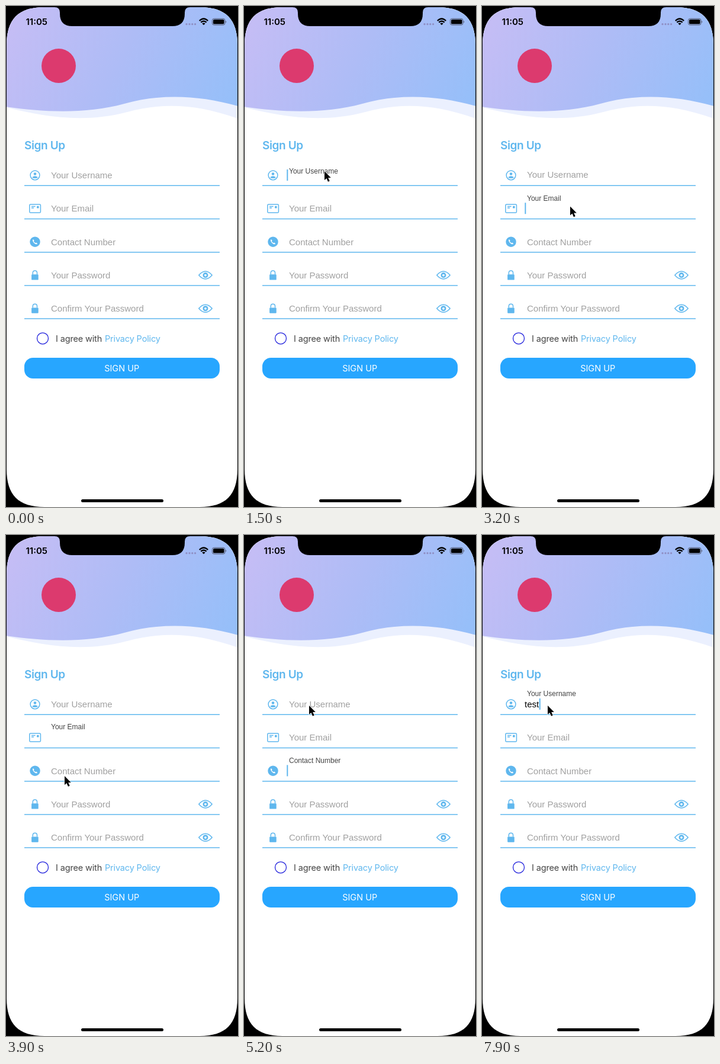
An HTML page for the animation above (8 s loop, 392x846 px).

```html
<!DOCTYPE html>
<html lang="en">
<head>
<meta charset="utf-8">
<title>Sign Up</title>
<style>
html, body { margin: 0; width: 100%; height: 100%; overflow: hidden; background: #000; }
svg { display: block; width: 392px; height: 846px; }
.ui { font-family: Inter, sans-serif; }
.field { font-family: "Liberation Sans", Arial, sans-serif; font-size: 15px; }
.blue { fill: #5fb7ee; }
.line { fill: none; stroke: #5fb7ee; stroke-width: 1.5; }
.body { font-size: 14.5px; letter-spacing: -.15px; }
</style>
</head>
<body>
<svg viewBox="0 0 392 846">
  <defs>
    <linearGradient id="sky" gradientUnits="userSpaceOnUse" x1="10" y1="20" x2="360" y2="200">
      <stop offset="0" stop-color="#c5bdf5"/>
      <stop offset=".5" stop-color="#aebcf6"/>
      <stop offset="1" stop-color="#96bff9"/>
    </linearGradient>
    <clipPath id="screen">
      <path d="M1 66C1 22 21 2 65 2H327C371 2 391 22 391 66V782C391 826 371 846 327 846H65C21 846 1 826 1 782Z"/>
    </clipPath>
    <g id="user">
      <circle r="7.9" class="line"/>
      <circle cy="-2.3" r="2.3" class="blue"/>
      <path d="M-4.7 4.2C-4 .6 4 .6 4.7 4.2Q0 6-4.7 4.2Z" class="blue"/>
    </g>
    <g id="mail">
      <rect x="-9.2" y="-7" width="18.6" height="14" rx="1.6" class="line"/>
      <path d="M-6-3.4H.6M-6-.9H-2" class="line" stroke-width="1.2"/>
      <rect x="3" y="-4.2" width="3.6" height="3.6" rx="1" class="blue"/>
    </g>
    <g id="phone">
      <circle r="8.7" class="blue"/>
      <path d="M-3.1-4.2C-4.7-3-4-.6-1.8 1.7S3 4.7 4.2 3.2L2.2 1.3 .8 2.1Q-1.3 1.1-2.2-.9L-1.3-2.2Z" fill="#fff"/>
    </g>
    <g id="lock">
      <rect x="-5.9" y="-1.2" width="11.6" height="9.4" rx="1.2" class="blue"/>
      <path d="M-3.7-1V-3.8C-3.7-8.6 3.5-8.6 3.5-3.8V-1" class="line"/>
    </g>
    <g id="eye">
      <path d="M-11.2 0Q0-13 11.2 0Q0 13-11.2 0Z" class="line" stroke-linejoin="round"/>
      <circle r="3.2" class="line" style="stroke-width:2.6"/>
    </g>
  </defs>

  <g clip-path="url(#screen)">
    <rect width="392" height="846" fill="#fff"/>
    <path d="M0 0V171C60 186 130 199 205 179C265 163 320 165 392 190V0Z" fill="#ebf0fe"/>
    <path d="M0 0V170C60 179 135 183 200 165C260 148 325 150 392 169V0Z" fill="url(#sky)"/>
  </g>
  <path d="M82 0V2Q91 2 91 11V13Q91 34 112 34H281Q302 34 302 13V11Q302 2 311 2V0Z"/>
  <circle cx="89" cy="101" r="29" fill="#dc3a6e"/>

  <text class="ui" x="33.5" y="32.3" font-size="15" font-weight="600">11:05</text>
  <g fill="#8f8fc4">
    <circle cx="305" cy="30.7" r="1.6"/><circle cx="310" cy="30.7" r="1.6"/>
    <circle cx="314.8" cy="30.7" r="1.6"/><circle cx="319.6" cy="30.7" r="1.6"/>
  </g>
  <g fill="none" stroke="#000" stroke-width="2.3">
    <path d="M326.8 25Q334 18 341.2 25M329.3 27.7Q334 23.2 338.7 27.7"/>
  </g>
  <path d="M331.3 29.5Q334 27.3 336.7 29.5L334 32.3Z"/>
  <rect x="348.5" y="21.3" width="21.5" height="10.8" rx="3" fill="none" stroke="#555a72"/>
  <rect x="350" y="22.8" width="18.5" height="7.8" rx="1.7"/>
  <path d="M371.2 25Q373.4 26.7 371.2 28.6Z" fill="#555a72"/>

  <text class="ui blue" x="31" y="242.3" font-size="19" font-weight="600" letter-spacing="-.4">Sign Up</text>
  <g id="rows"></g>
  <text id="typed" class="field" x="72" y="291"></text>
  <rect id="caret" width="2" height="19" class="blue"/>

  <circle cx="62" cy="561.3" r="9.5" fill="none" stroke="#2020dc" stroke-width="1.3"/>
  <text class="ui body" x="84" y="566.6" fill="#444">I agree with</text>
  <text class="ui body blue" x="167" y="566.6">Privacy Policy</text>
  <rect x="31" y="594" width="330" height="35" rx="14.5" fill="#27a6ff"/>
  <text class="ui" x="195.7" y="616.8" font-size="14.5" fill="#fff" text-anchor="middle">SIGN UP</text>
  <rect x="127" y="833" width="139" height="5" rx="2.5"/>
  <path id="mouse" d="M0 0V15L3.4 11.9 6 17.7 8.7 16.5 6.2 10.9H10.8Z" stroke="#fff" stroke-width="1.2" paint-order="stroke"/>
</svg>
<script>
const LOOP = 8000, STEP = 100, FLOAT = 230;
const $ = id => document.getElementById(id);
const rowY = i => 285.8 + 56.2 * i;
const ease = p => p * p * (3 - 2 * p);
const clamp = p => Math.max(0, Math.min(1, p));

const fields = [
  ['user', 'Your Username'], ['mail', 'Your Email'], ['phone', 'Contact Number'],
  ['lock', 'Your Password', true], ['lock', 'Confirm Your Password', true]
];
$('rows').innerHTML = fields.map(([icon, label, eye], i) => {
  const y = rowY(i);
  return `<use href="#${icon}" x="49" y="${y}"/>
    <text class="field" x="76">${label}</text>
    ${eye ? `<use href="#eye" x="337" y="${y + .2}"/>` : ''}
    <path class="line" d="M31 ${y + 17.5}H361"/>`;
}).join('');
const labels = [...$('rows').querySelectorAll('text')];

// [time, focused row]
const focus = [[1400, 0], [3000, 1], [4100, 2], [5300, 0]];
// [time, x, y] of the pointer tip
const path = [
  [900, 300, 850], [1300, 136, 279], [1900, 136, 279], [2400, 153, 333],
  [3100, 153, 333], [3700, 99, 407], [4400, 99, 407], [5100, 110, 288],
  [5500, 110, 288], [5800, 111, 288]
];
const keys = [6700, 6900, 7200, 7500];

function pointer(t) {
  const i = path.findIndex(p => p[0] > t);
  if (i < 0) return path[path.length - 1].slice(1);
  if (i === 0) return [-50, -50];
  const [a, x, y] = path[i - 1], [b, u, v] = path[i];
  const p = ease((t - a) / (b - a));
  return [x + (u - x) * p, y + (v - y) * p];
}

function draw(t) {
  const past = focus.filter(f => f[0] <= t);
  const [since, row] = past[past.length - 1] || [0, -1];
  const before = past.length > 1 ? past[past.length - 2][1] : -1;
  const p = ease(clamp((t - since) / FLOAT));

  labels.forEach((el, i) => {
    const on = i === row;
    const lift = on ? p : i === before ? 1 - p : 0;
    el.setAttribute('y', rowY(i) + 5.3 - 19 * lift);
    el.style.fontSize = on ? '12px' : '15px';
    el.style.fill = on ? '#444' : '#a0a0a0';
  });

  const hits = keys.filter(k => k <= t);
  const blinkFrom = hits.length ? hits[hits.length - 1] : since;
  const shown = row >= 0 && (t - blinkFrom) % 1000 < 600;
  $('typed').textContent = 'test'.slice(0, hits.length);
  $('caret').setAttribute('x', 72.3 + [0, 4.2, 12.5, 20, 24.4][hits.length]);
  $('caret').setAttribute('y', rowY(Math.max(row, 0)) - 9.8);
  $('caret').style.opacity = shown ? 1 : 0;
  $('mouse').setAttribute('transform', `translate(${pointer(t)})`);
}

const start = performance.now();
function tick() {
  const t = (performance.now() - start) % LOOP;
  draw(Math.floor(t / STEP) * STEP);
  requestAnimationFrame(tick);
}
tick();
</script>
</body>
</html>
```
